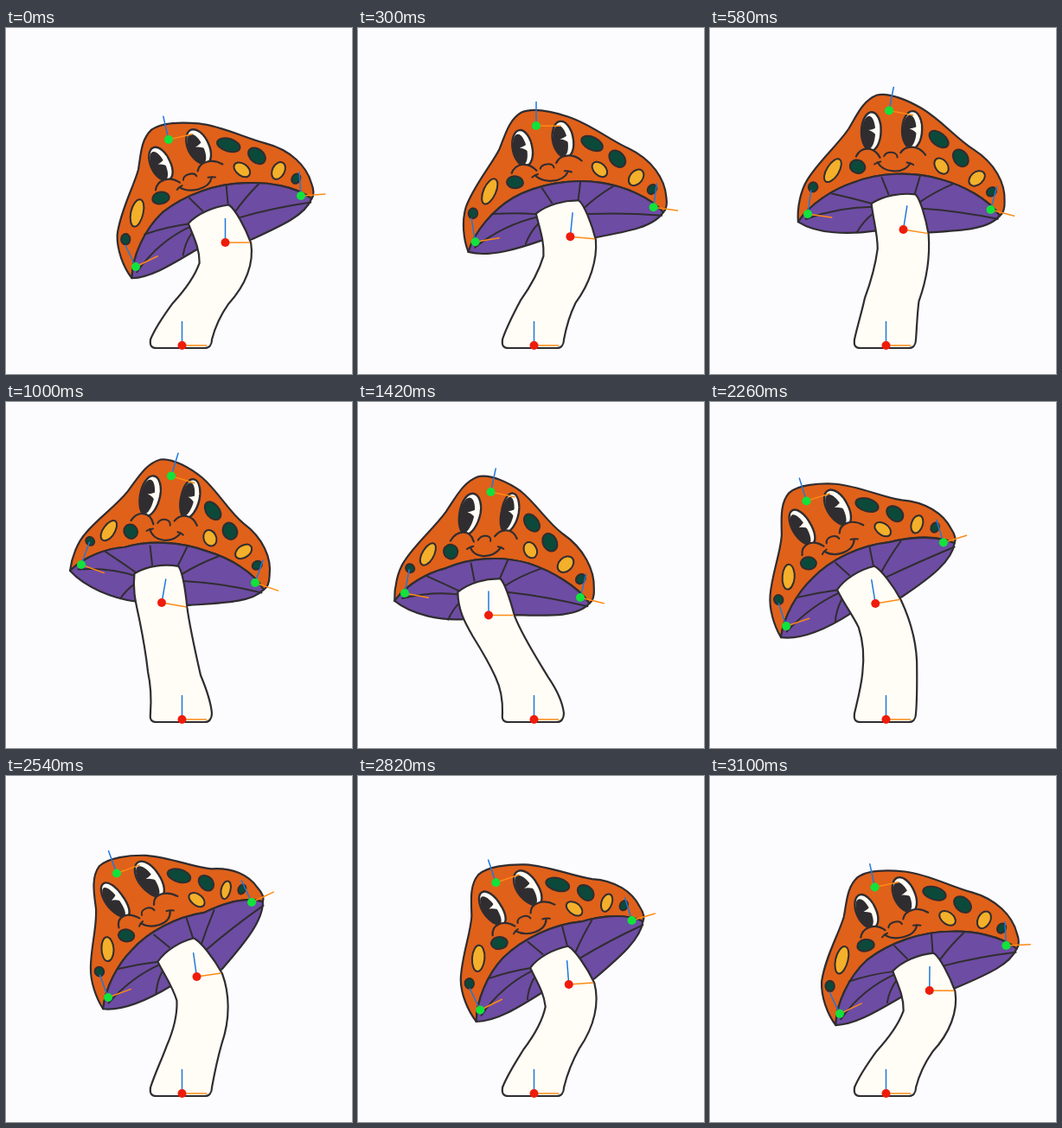
These frames come from a looping animation (400 px wide and 400 px high, 3120 ms). An HTML page:

```html
<!DOCTYPE html>
<html lang="en">
<head>
<meta charset="utf-8">
<title>Mushroom rig</title>
<style>
  html, body { margin: 0; width: 100%; height: 100%; overflow: hidden; background: #fcfcff; }
  svg { display: block; width: 100vw; height: 100vh; }
  path { stroke-linecap: round; stroke-linejoin: round; }
</style>
</head>
<body>
<svg id="stage" viewBox="0 0 400 400"></svg>
<script>
const LOOP = 3120, CYCLE = 66.4, REST = 4;
const INK = '#302d30', ORANGE = '#e0611a', PURPLE = '#6d4ca3', CREAM = '#fffdf6',
      GREEN = '#0b4a3b', YELLOW = '#f4b02a';
const stage = document.getElementById('stage');
const rad = Math.PI / 180;

// Joint poses [x, y, degrees] at these steps of the cycle
const knots = [0, 13, 22, 31, 43, 55];
const joints = {
  top:   [[188, 129, -13], [207, 95.5, 11], [191, 85.5, 17], [153.5, 104, 12], [111.5, 117, -10], [128, 112.5, -20]],
  left:  [[150, 276, -26], [113, 215, 8], [87, 188, 20], [54, 221, 11], [62, 259.5, -14], [118, 256, -20]],
  right: [[341, 194, -4], [324.5, 210, 15], [288, 209, 19], [257, 226, 14], [264, 192.5, -3], [284, 146, -25]],
  mid:   [[253.5, 248, 0], [223.5, 233, 9], [180, 232, 10], [151, 246.5, 0], [165, 238, -8], [220.5, 232, -8]]
};
const capNames = ['top', 'left', 'right'];
const base = [203.5, 367, 0];

const smooth = (a, b, v) => {
  const u = Math.min(1, Math.max(0, (v - a) / (b - a)));
  return u * u * (3 - 2 * u);
};

// Periodic curve whose slopes are exact for a sine wave
const count = knots.length;
const knotAt = i => knots[(i + count) % count] + CYCLE * Math.floor(i / count);
function curve(values) {
  const at = i => values[(i + count) % count];
  const term = (i, j) => {
    const h = (knotAt(j) - knotAt(i)) * 2 * Math.PI / CYCLE;
    return [(at(j) - at(i)) / Math.sin(h), Math.tan(h / 2)];
  };
  const slope = i => {
    const [s1, k1] = term(i, i - 1), [s2, k2] = term(i, i + 1);
    return (s1 * k2 - s2 * k1) / (k2 - k1) * 2 * Math.PI / CYCLE;
  };
  return step => {
    const p = step % CYCLE;
    let i = count - 1;
    while (knots[i] > p) i--;
    const h = knotAt(i + 1) - knotAt(i), u = (p - knotAt(i)) / h, v = 1 - u;
    return at(i) * v * v * (1 + 2 * u) + at(i + 1) * u * u * (3 - 2 * u)
      + h * u * v * (slope(i) * v - slope(i + 1) * u);
  };
}
const tracks = {};
for (const name in joints)
  tracks[name] = [0, 1, 2].map(axis => curve(joints[name].map(pose => pose[axis])));

// Path helpers: every path is a string of "x y" pairs
const mapPoints = (d, fn) => d.replace(/(-?[\d.]+) (-?[\d.]+)/g,
  (_, x, y) => fn(+x, +y).map(n => n.toFixed(2)).join(' '));
const place = (d, cx, cy, deg) => {
  const c = Math.cos(deg * rad), s = Math.sin(deg * rad);
  return mapPoints(d, (x, y) => [cx + x * c - y * s, cy + x * s + y * c]);
};
const oval = (cx, cy, rx, ry, deg = 0) => {
  const a = rx * 0.552, b = ry * 0.552;
  return place(`M${rx} 0 C${rx} ${b} ${a} ${ry} 0 ${ry} C${-a} ${ry} ${-rx} ${b} ${-rx} 0 ` +
    `C${-rx} ${-b} ${-a} ${-ry} 0 ${-ry} C${a} ${-ry} ${rx} ${-b} ${rx} 0 Z`, cx, cy, deg);
};

function add(tag, attrs) {
  const el = document.createElementNS('http://www.w3.org/2000/svg', tag);
  for (const key in attrs) el.setAttribute(key, attrs[key]);
  return stage.appendChild(el);
}

// Joint weights of a point, found once in the rest pose
function weigh(x, y, stem) {
  const capShare = stem ? 1 - smooth(200, 250, y) : 1;
  const rootShare = stem ? smooth(240, 362, y) : 0;
  const weights = {};
  let sum = 0;
  for (const name in joints) {
    const [jx, jy] = joints[name][REST];
    const w = 1 / ((x - jx) ** 2 + (y - jy) ** 2 + 1);
    sum += weights[name] = name === 'mid' ? w : w * capShare;
  }
  for (const name in weights) weights[name] *= (1 - rootShare) / sum;
  return { weights, rootShare };
}

const skins = [];
function skin(d, fill, width = 2.2, stem = false) {
  const points = [];
  mapPoints(d, (x, y) => {
    points.push({ x, y, ...weigh(x, y, stem) });
    return [x, y];
  });
  const el = add('path', { fill, stroke: width ? INK : 'none', 'stroke-width': width });
  skins.push({ el, d, points });
}

function eye(cx, cy, deg) {
  skin(oval(cx, cy, 11.5, 21.5, deg), CREAM, 2.4);
  skin(place(oval(-3, 1.5, 8, 18.5), cx, cy, deg), INK, 0);
  skin(place('M10 -7 Q4 -2 -3 -1 Q4 1 7 6 Z', cx, cy, deg), CREAM, 0);
}

// Cap
skin('M55 272 C48 258 44 238 47 222 C52 198 68 172 74 152 C78 134 79 116 92 105 ' +
  'C104 97 128 98 146 101 C172 106 196 121 220 128 C250 137 270 157 276 178 C279 186 279 192 276 196 ' +
  'C258 181 222 173 194 172 C158 172 122 186 98 206 C78 222 60 248 55 272 Z', ORANGE);
skin('M55 272 C60 248 78 222 98 206 C122 186 158 172 194 172 C222 173 258 181 276 196 ' +
  'C268 214 240 223 197 233 L137 249 C112 264 80 277 55 272 Z', PURPLE);
for (const line of [
  'M78 227 Q102 223 126 221', 'M62 266 Q92 238 127 224', 'M119 258 Q121 244 128 232',
  'M127 190 L139 205', 'M169 174 L168 197', 'M210 174 Q190 188 176 203', 'M181 209 Q228 203 275 200'
]) skin(line, 'none', 2);

// Spots
for (const [x, y, rx, ry, deg, color] of [
  [71, 202, 7, 15, 14, YELLOW], [190, 157, 10.5, 7, 35, YELLOW], [236, 161, 8, 10.5, 28, YELLOW],
  [97, 188, 9, 7.2, -8, GREEN], [56, 228, 5.2, 5.6, 0, GREEN], [177, 128, 13, 7.4, 20, GREEN],
  [209, 142, 11.5, 8, 38, GREEN], [258, 172, 5, 6, 25, GREEN]
]) skin(oval(x, y, rx, ry, deg), color, 2);

// Face
eye(100, 146, -18);
eye(144, 128, -18);
skin('M92 178 C94 166 108 160 119 170', ORANGE);
skin('M140 157 C143 146 157 142 168 150', ORANGE);
skin('M123 167 C124 160 136 157 138 163', 'none', 2);
skin('M118 176 C127 184 149 180 154 165', 'none');
skin('M115 179 Q117 176 121 174', 'none', 2);
skin('M150 165 Q154 164 158 165', 'none', 2);

// Stem
skin('M123 221 C134 208 152 199 169 196 C176 200 187 218 195 235 C206 257 221 285 229 312 ' +
  'C234 328 238 346 238 360 C238 366 235 370 230 370 L174 370 C168 370 166 367 167 360 ' +
  'C169 345 170 330 167 315 C163 295 156 279 148 265 C138 249 129 238 123 221 Z', CREAM, 2.2, true);

// Joint markers
function marker(color) {
  return {
    up: add('path', { stroke: '#1f78dc', 'stroke-width': 1.5 }),
    side: add('path', { stroke: '#ff8a14', 'stroke-width': 1.5 }),
    dot: add('circle', { r: 5, fill: color })
  };
}
function setMarker({ up, side, dot }, [x, y, deg]) {
  up.setAttribute('d', place('M0 0 L0 -27.5', x, y, deg));
  side.setAttribute('d', place('M0 0 L28 0', x, y, deg));
  dot.setAttribute('cx', x);
  dot.setAttribute('cy', y);
}
const markers = { mid: marker('#ee1c0a') };
for (const name of capNames) markers[name] = marker('#12e23c');
setMarker(marker('#ee1c0a'), base);

// Steps come in groups of three, held for 100, 20 and 20 ms
function stepAt(ms) {
  if (ms < 20) return 0;
  const rest = (ms - 20) % 140;
  return 1 + 3 * Math.floor((ms - 20) / 140) + (rest < 100 ? 0 : rest < 120 ? 1 : 2);
}

function draw(step) {
  const bones = {};
  for (const name in joints) {
    const pose = tracks[name].map(track => track(step));
    const [rx, ry, rdeg] = joints[name][REST];
    const turn = (pose[2] - rdeg) * rad;
    bones[name] = { x: pose[0], y: pose[1], rx, ry, c: Math.cos(turn), s: Math.sin(turn) };
    setMarker(markers[name], pose);
  }
  for (const { el, d, points } of skins) {
    let i = 0;
    el.setAttribute('d', mapPoints(d, () => {
      const { x, y, weights, rootShare } = points[i++];
      let px = x * rootShare, py = y * rootShare;
      for (const name in weights) {
        const b = bones[name], dx = x - b.rx, dy = y - b.ry;
        px += weights[name] * (b.x + dx * b.c - dy * b.s);
        py += weights[name] * (b.y + dx * b.s + dy * b.c);
      }
      return [px, py];
    }));
  }
}

const start = performance.now();
let shown = -1;
function tick() {
  const step = stepAt((performance.now() - start) % LOOP);
  if (step !== shown) draw(shown = step);
  requestAnimationFrame(tick);
}
tick();
</script>
</body>
</html>
```
